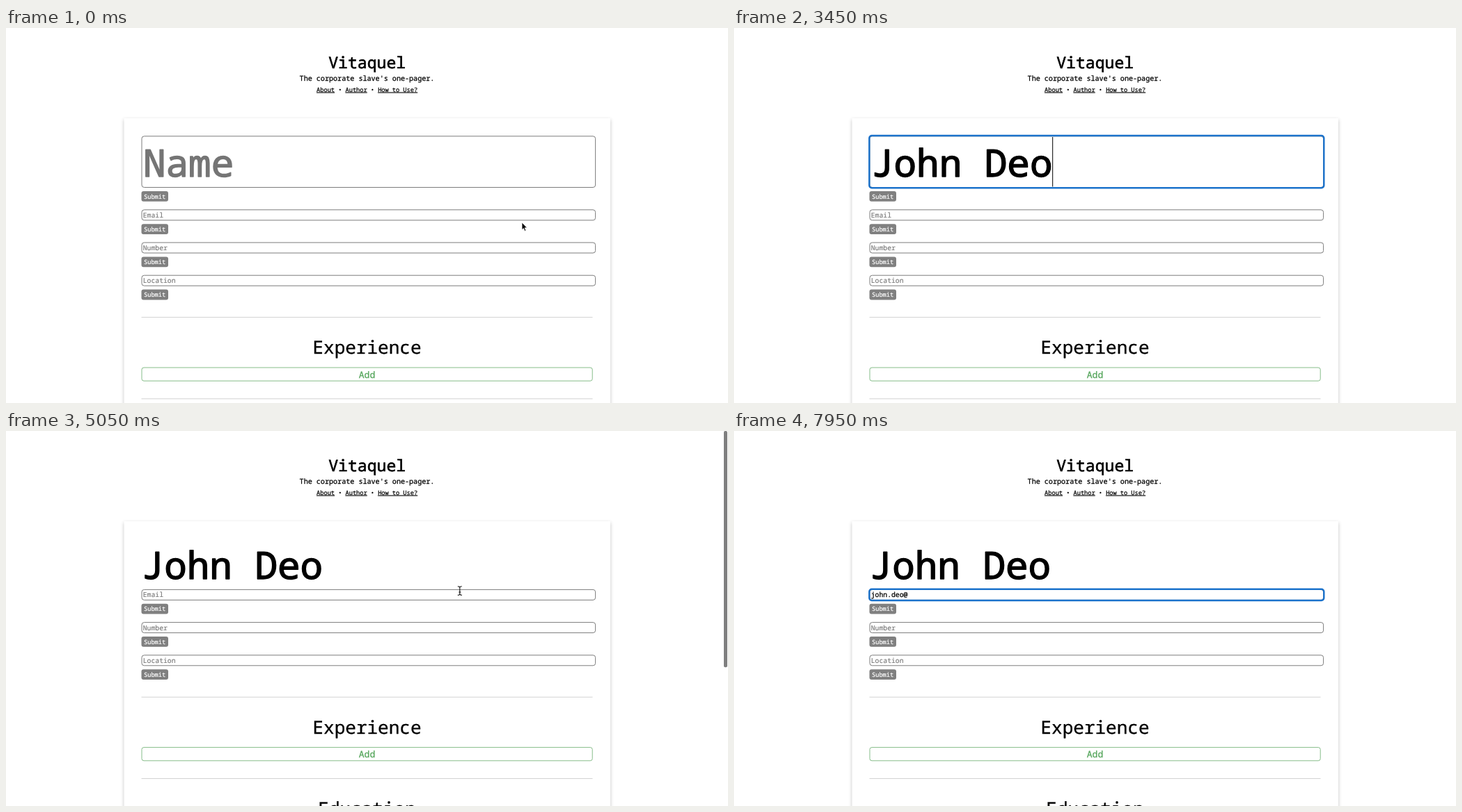
An HTML page for the animation above (8 s loop, 1037 px wide and 540 px high).

```html
<!DOCTYPE html>
<html lang="en">
<head>
<meta charset="utf-8">
<title>Resume form</title>
<style>
html, body { margin: 0; width: 100%; height: 100%; overflow: hidden; background: #fff; }
svg { display: block; width: 1037px; height: 540px; }
text {
  font-family: "Roboto Mono", "Noto Sans Mono", "DejaVu Sans Mono", monospace;
  text-rendering: geometricPrecision;
  fill: currentColor; stroke: currentColor; stroke-width: .012em; stroke-linejoin: round;
}
.mid { text-anchor: middle; }
.medium { stroke-width: .026em; }
.link { text-decoration: underline; }
.big { font-size: 54.27px; }
.small { font-size: 9.78px; }
.hint { color: #757575; }
.card { fill: #fff; filter: drop-shadow(0 2px 2.7px rgba(0, 0, 0, .24)); }
.box { fill: #fff; stroke: #7c7c7c; }
.ring { fill: none; stroke: #1b72cb; stroke-width: 2.4; }
.button { fill: #808080; }
.label { color: #fff; font-size: 8.69px; }
.rule { stroke: #d2d2d2; }
.add { fill: #fff; stroke: #86bd89; }
</style>
</head>
<body>
<svg viewBox="0 0 1037 540">
  <text class="mid medium" x="518.7" y="58" font-size="23.1">Vitaquel</text>
  <text class="mid medium" x="518.5" y="75.6" font-size="10.1">The corporate slave's one-pager.</text>
  <text class="mid medium" x="518.6" y="91.6" font-size="8.65"><tspan class="link">About</tspan> • <tspan class="link">Author</tspan> • <tspan class="link">How to Use?</tspan></text>
  <rect class="card" x="169.5" y="130" width="698.5" height="600"/>

  <g id="nameField">
    <rect class="box" x="195" y="155.8" width="651.6" height="73.7" rx="3.5"/>
    <rect class="ring" id="nameRing" x="194.3" y="155" width="653" height="75.2" rx="3.5"/>
    <text class="big medium hint" id="nameHint" x="197" y="214">Name</text>
    <text class="big medium" id="nameText" x="197" y="214"></text>
    <rect id="nameCaret" y="157" width="1" height="71.5"/>
    <rect class="button" x="194.5" y="235" width="38.5" height="14.8" rx="3"/>
    <text class="label medium" x="198" y="245.6">Submit</text>
  </g>

  <g id="heading">
    <text class="big medium" x="194.6" y="212.6">John Deo</text>
    <rect id="underline" x="194.6" y="215.8" width="260.4" height="2.6" fill="currentColor"/>
  </g>

  <g id="below">
    <g id="fields"></g>
    <rect class="ring" id="mailRing" x="194.3" y="261.2" width="653" height="16.2" rx="3.5"/>
    <text class="small medium" id="mailText" x="196.7" y="272.8"></text>
    <rect id="mailCaret" y="262.8" width="1" height="13"/>
    <g id="sections"></g>
  </g>

  <rect id="scroll" x="1031" y="0" width="5" height="340.3" rx="2" fill="#7f7f7f"/>

  <g id="cursor">
    <path id="arrow" d="M0 0V10.6L2.4 8.5 4 12.4 5.8 11.6 4.2 7.8H7.4Z" stroke="#fff" stroke-width=".8"/>
    <g id="hand" fill="#fff" stroke="#000" stroke-linejoin="round" transform="translate(-5.5 -2)">
      <path d="M3 8V2Q3 .8 4 .8 5 .8 5 2V5.3Q5.8 4.6 6.7 5.5 7.6 4.9 8.4 6 9.6 5.6 10.2 6.8V9.5Q10 11 9.2 12.8H4.5Q3.4 10.8 .9 8 .4 6.8 1.6 6.8Z"/>
      <path d="M5.3 8.5V11M6.8 8.5V11M8.3 8.5V11" stroke-width=".6"/>
    </g>
    <path id="beam" d="M-3-6.3Q0-6.3 0-4.8 0-6.3 3-6.3M0-4.8V4.8M-3 6.3Q0 6.3 0 4.8 0 6.3 3 6.3M-1.6 2H1.6" fill="none" stroke="#111" stroke-width="1.1"/>
  </g>
</svg>
<script>
const $ = id => document.getElementById(id);
const LOOP = 8000, TICK = 50, BLINK = 565, SUBMIT = 3600, MOVE = 4400;

$("fields").innerHTML = ["Email", "Number", "Location"].map((hint, i) => `
  <g transform="translate(0 ${i * 47.2})">
    <rect class="box" x="195" y="261.8" width="651.6" height="15" rx="3.5"/>
    <text class="small hint" id="hint${i}" x="196.7" y="272.8">${hint}</text>
    <rect class="button" x="194.5" y="282.2" width="38.5" height="14.8" rx="3"/>
    <text class="label medium" x="198" y="292.8">Submit</text>
  </g>`).join("");

$("sections").innerHTML = ["Experience", "Education"].map((title, i) => `
  <g transform="translate(0 ${i * 117.3})">
    <path class="rule" d="M194.5 416.6H842.5"/>
    <text class="mid" x="518.5" y="469.3" font-size="26">${title}</text>
    <rect class="add" x="195" y="489" width="647.2" height="19.2" rx="3"/>
    <text class="mid medium" x="518.5" y="503.5" font-size="13" color="#5aa860">Add</text>
  </g>`).join("");

// A burst of keys: the text, its first key and the pause between keys
const burst = (text, start, gap = 0) => [...text].map((char, i) => ({ char, time: start + i * gap }));

const name = {
  id: "name", focus: 550, left: 197.2, pitch: 32.56,
  keys: [burst("J", 1100), burst("o", 1400), burst("hn D", 1750, 66), burst("eo", 2450, 100)].flat()
};
const mail = {
  id: "mail", focus: 5120, left: 196.9, pitch: 5.868,
  keys: [burst("joh", 5800, 75), burst("n.", 6200, 200), burst("deo", 6650, 150), burst("@", 7450)].flat()
};

const clamp = v => Math.min(1, Math.max(0, v));
const mix = (a, b, k) => a + (b - a) * k;
const show = (id, amount) => $(id).setAttribute("opacity", +amount);
const shift = (id, x, y) => $(id).setAttribute("transform", `translate(${x} ${y})`);

// The blink clock runs on from focus; each key makes the caret visible again.
function drawInput({ id, focus, left, pitch, keys }, hint, t) {
  const done = keys.filter(key => key.time <= t);
  const last = done.length ? done.at(-1).time : focus;
  const beat = time => Math.floor((time - focus) / BLINK);
  $(id + "Text").textContent = done.map(key => key.char).join("");
  $(id + "Caret").setAttribute("x", left + done.length * pitch - .5);
  show(id + "Caret", t >= focus && (beat(t) - beat(last)) % 2 === 0);
  show(id + "Ring", t >= focus);
  show(hint, !done.length);
}

function drawPointer(t) {
  const reach = 1 - (1 - clamp(t / 200)) ** 2;
  const leave = clamp((t - MOVE) / 750);
  const x = mix(mix(741, 689.5, reach), 646, leave);
  const y = mix(mix(280, 198, reach), 235, leave);
  const shape = t < TICK ? "arrow" : t >= MOVE && y < 223 ? "hand" : "beam";
  for (const id of ["arrow", "hand", "beam"]) show(id, id === shape);
  shift("cursor", x, y);
  show("cursor", t < name.keys[0].time || t >= MOVE && t < mail.keys[0].time);
  $("heading").setAttribute("color", shape === "hand" ? "#808080" : "#000");
  show("underline", shape === "hand");
}

function scrollAlpha(t) {
  if (t < 4050) return t >= SUBMIT;
  return clamp(Math.min((t - 4350) / 100, (5950 - t) / 300));
}

function draw(time) {
  const t = Math.floor(time % LOOP / TICK) * TICK;
  const sent = t >= SUBMIT;
  show("nameField", !sent);
  show("heading", sent);
  shift("below", 0, sent ? -33.4 : 0);
  drawInput(name, "nameHint", t);
  drawInput(mail, "hint0", t);
  drawPointer(t);
  show("scroll", scrollAlpha(t));
}

const start = performance.now();
function frame() {
  draw(performance.now() - start);
  requestAnimationFrame(frame);
}
frame();
</script>
</body>
</html>
```
